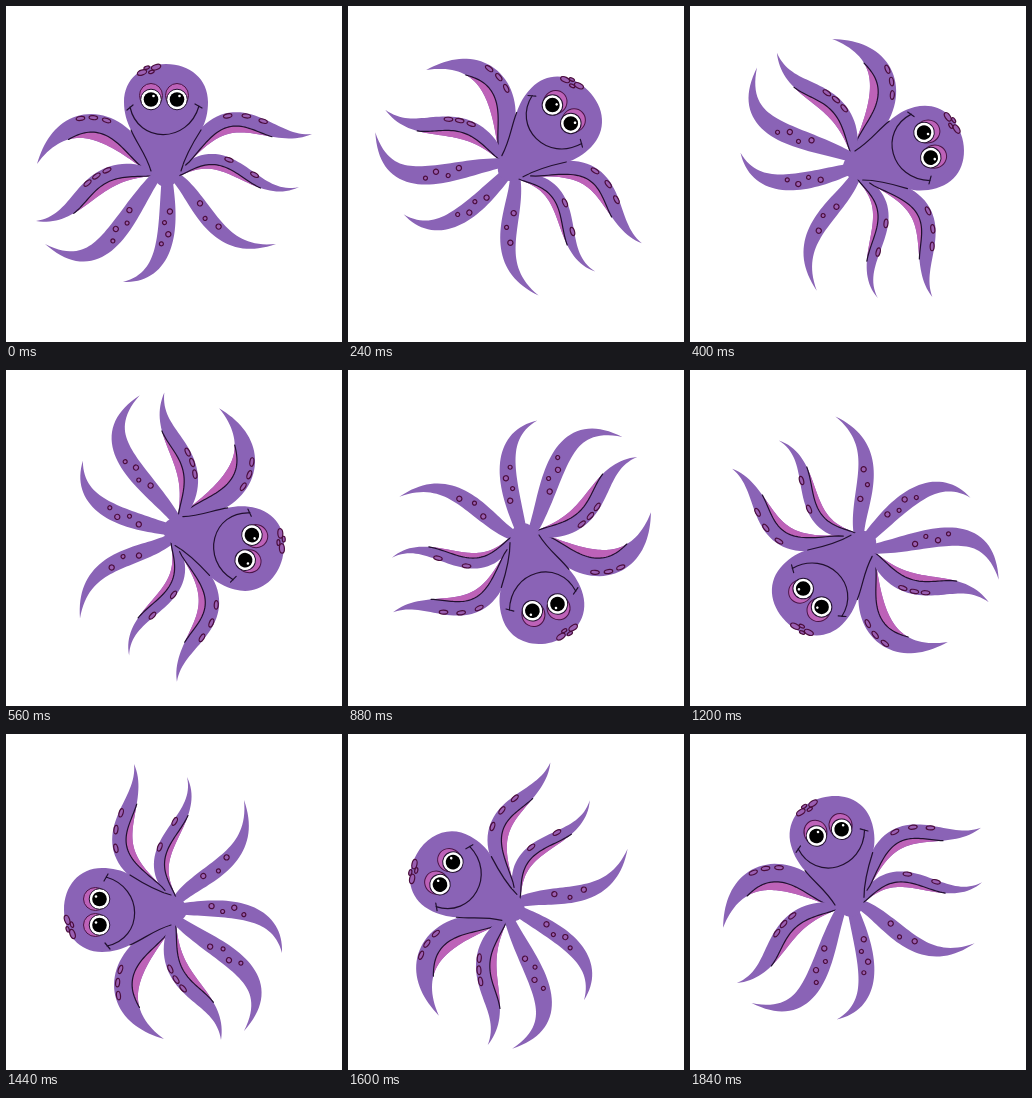
An HTML page that plays this animation: 336 by 336 pixels, repeating every 1920 ms.

```html
<!DOCTYPE html>
<html lang="en">
<head>
<meta charset="utf-8">
<title>Spinning octopus</title>
<style>
  html, body { margin: 0; width: 100%; height: 100%; overflow: hidden; background: #fff; }
  svg { display: block; width: 100vw; height: 100vh; }
  .skin { fill: #8a63b6; }
  .pink { fill: #bd62b8; }
  .line { fill: none; stroke: #21102f; stroke-width: 1.2; stroke-linecap: round; }
  .spot { fill: #9a5fb2; stroke: #4a0d3c; stroke-width: 1.2; }
  .lid { fill: #bd62b8; stroke: #4a1447; }
  .white { fill: #fff; stroke: #21102f; }
</style>
</head>
<body>
<svg viewBox="0 0 336 336">
  <g id="octopus"></g>
</svg>
<script>
const STEP_MS = 80, STEPS = 24, CENTER = 168;
const octopus = document.getElementById("octopus");

function add(tag, attrs) {
  const node = document.createElementNS("http://www.w3.org/2000/svg", tag);
  for (const key in attrs) node.setAttribute(key, attrs[key]);
  octopus.append(node);
}
const shape = (name, d) => add("path", { class: name, d });
const spot = (x, y, rx, ry, tilt) =>
  add("ellipse", { class: "spot", rx, ry, transform: `translate(${x} ${y}) rotate(${tilt})` });
const disc = (name, cx, cy, rx, ry = rx) => add("ellipse", { class: name, cx, cy, rx, ry });
const toPath = points => "M" + points.map(p => p.map(v => v.toFixed(2)).join(" ")).join("L");

// Samples a function of t from 0 to end.
const sample = (fn, end = 1, count = 40) =>
  Array.from({ length: count + 1 }, (_, i) => fn(end * i / count));

// Point and direction on a cubic curve.
function along([a, b, c, d], t) {
  const u = 1 - t;
  const axis = k => u * u * u * a[k] + 3 * u * u * t * b[k] + 3 * u * t * t * c[k] + t * t * t * d[k];
  const slope = k => u * u * (b[k] - a[k]) + 2 * u * t * (c[k] - b[k]) + t * t * (d[k] - c[k]);
  return { x: axis(0), y: axis(1), angle: Math.atan2(slope(1), slope(0)) };
}

// A tapering arm: side is where its underside lies, spots are [count, from, to] along it.
function drawArm({ spine, bulge, side, spots: [count, from, to], under }) {
  const root = under ? 2 : 4.5, skew = under ? 0.7 : 1;
  const halfWidth = t => root * (1 - t) + bulge * Math.sin(Math.PI * t ** skew);
  const offset = (t, amount) => {
    const { x, y, angle } = along(spine, t), r = amount * side * halfWidth(t);
    return [x - r * Math.sin(angle), y + r * Math.cos(angle)];
  };
  const edge = (amount, end) => sample(t => offset(t, amount), end);

  shape("skin", toPath([...edge(1), ...edge(-1).reverse()]) + "Z");
  if (under) {
    const end = 0.7;
    const fold = sample(t => offset(t, 1 - 0.65 * Math.sin(Math.PI * t / end)), end);
    shape("pink", toPath([...fold, ...edge(1, end).reverse()]) + "Z");
    shape("line", toPath(fold));
  }
  for (let i = 0; i < count; i++) {
    const t = from + (to - from) * i / (count - 1);
    const [x, y] = offset(t, under ? -0.72 : i % 2 ? 0.3 : -0.3);
    const size = i % 2 ? 2 : 2.6;
    spot(x, y, under ? 4.3 : size, under ? 2 : size, along(spine, t).angle * 180 / Math.PI);
  }
}

const arms = [
  { spine: [[143, 163], [104, 106], [55, 108], [31, 158]], bulge: 12, side: -1, spots: [3, 0.37, 0.55], under: true },
  { spine: [[148, 167], [80, 155], [78, 215], [30, 215]], bulge: 9, side: -1, spots: [3, 0.28, 0.45], under: true },
  { spine: [[152, 168], [118, 208], [98, 278], [39, 238]], bulge: 7, side: -1, spots: [4, 0.28, 0.5] },
  { spine: [[161, 165], [161, 205], [170, 270], [117, 276]], bulge: 6, side: 1, spots: [4, 0.3, 0.54] },
  { spine: [[166, 168], [196, 190], [207, 252], [270, 238]], bulge: 5.8, side: 1, spots: [3, 0.33, 0.56] },
  { spine: [[172, 168], [222, 128], [248, 197], [293, 181]], bulge: 6.5, side: 1, spots: [2, 0.38, 0.61], under: true },
  { spine: [[178, 158], [225, 78], [262, 140], [306, 128]], bulge: 9, side: 1, spots: [3, 0.34, 0.6], under: true }
];
arms.forEach(drawArm);

const leftSide = "M125 124C131 138 140 148 145 165";
const rightSide = "C186 138 179 150 175 165";
shape("skin", leftSide + "Q150 181 160 181T175 165C179 150 186 138 195 124C200 116 202 106 202 96" +
  "C202 73 184 58 160 58S118 73 118 96C118 107 121 116 125 124Z");
shape("line", leftSide + "M195 124" + rightSide);
shape("line", "M124 101C132 138 182 138 193 100M121 104L127 99M189 98L196 102");

for (let i = 0; i < 4; i++) {
  const size = i % 3 ? 0.6 : 1;
  spot(136 + 4.7 * i, 66.5 - 4.5 * (i % 2) - 0.3 * i, 4.8 * size, 2.5 * size, -18);
}
for (const x of [145, 171]) {
  disc("lid", x, 89.5, 11.5, 12);
  disc("white", x, 93.5, 10.3);
  disc("pupil", x, 93.5, 7.3);
  disc("glint", x + 2.5, 90, 1.3);
  octopus.lastChild.style.fill = "#fff";
}

function draw(time) {
  const step = Math.floor(time / STEP_MS) % STEPS;
  octopus.setAttribute("transform", `rotate(${step * 360 / STEPS} ${CENTER} ${CENTER})`);
}

let start;
function tick(now) {
  start ??= now;
  draw(now - start);
  requestAnimationFrame(tick);
}
draw(0);
requestAnimationFrame(tick);
</script>
</body>
</html>
```
